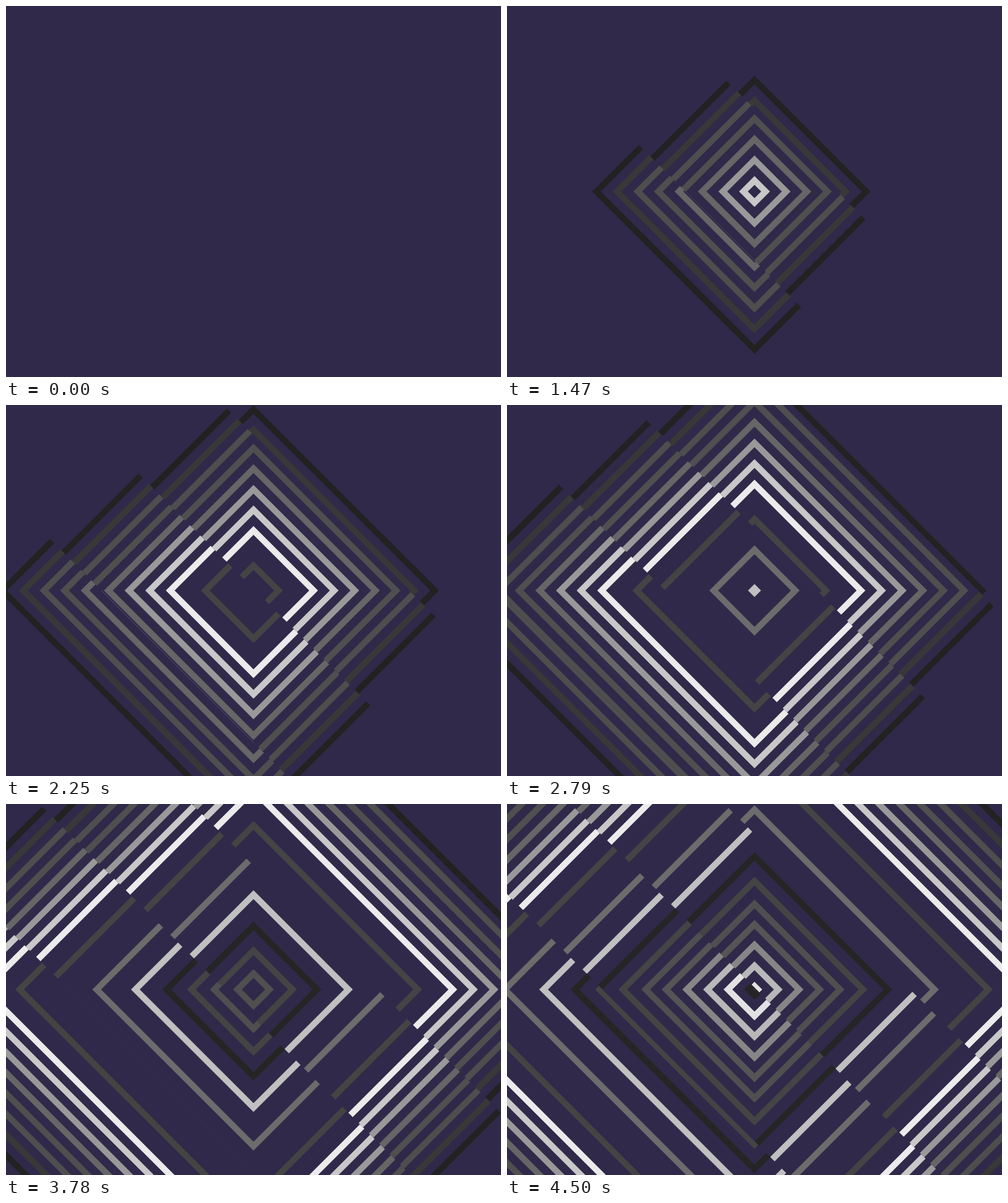
These frames come from a looping animation (800x600 px, 4530 ms). An HTML page with a canvas:

```html
<!DOCTYPE html>
<html lang="en">
<head>
<meta charset="utf-8">
<title>Stepped diamonds</title>
<style>
  html, body { margin: 0; width: 100%; height: 100%; overflow: hidden; background: #30294a; }
  canvas { display: block; }
</style>
</head>
<body>
<canvas id="stage" width="800" height="600"></canvas>
<script>
const ctx = document.getElementById('stage').getContext('2d');

const LOOP = 4530, TICK = 30;
const WAVE = 100 / 3;     // wave travel per tick
const STRIP = 250;        // wave travel between two steps
const GROW = 37.5;        // ring growth at each step
const LINE = 10 * Math.SQRT2;
const REACH = 500;        // the wave is flat beyond this
const FAR = 1600;

// [how far the ring trails behind the first one, colour]
const rings = [
  [0, '#222222'], [33.3, '#383838'], [66.7, '#4e4e4e'], [100, '#4f4f4f'],
  [133.3, '#666666'], [166.7, '#999999'], [200, '#c8c8c8'], [233.3, '#ebebeb'],
  [290, '#444444'], [377, '#6c6c6c'], [439.5, '#c0c0c0'], [490, '#252525'],
  [530, '#444444'], [567, '#4f4f4f'], [600, '#555555'], [633.3, '#868686'],
  [667, '#b8b8b8'], [700, '#e2e2e2'], [733.3, '#252525']
];

// Phase of the wave at a distance from the centre; it flattens outwards.
const phase = d => 1.02 * d * (1 - (d / 1040) ** 3);

// Place where the wave has the given phase.
function place(x) {
  let lo = 0, hi = 655;
  for (let i = 0; i < 30; i++) {
    const mid = (lo + hi) / 2;
    if (phase(mid) < Math.abs(x)) lo = mid; else hi = mid;
  }
  return Math.sign(x) * lo + 3;
}

function square(half) {
  ctx.rect(-half, -half, 2 * half, 2 * half);
}

function drawStrip(low, high, size) {
  ctx.save();
  ctx.beginPath();
  ctx.rect(-FAR, low, 2 * FAR, high - low);
  ctx.clip();
  for (const [lag, colour] of rings) {
    const r = size - lag;
    if (r <= 0) break;
    ctx.beginPath();
    square(r);
    if (r > LINE) square(r - LINE);
    ctx.fillStyle = colour;
    ctx.fill('evenodd');
  }
  ctx.restore();
}

function draw(tick) {
  ctx.setTransform(1, 0, 0, 1, 0, 0);
  ctx.fillStyle = '#30294a';
  ctx.fillRect(0, 0, 800, 600);
  // first axis points down right, second axis up right
  ctx.setTransform(0.5, 0.5, 0.5, -0.5, 400, 300);

  const front = tick * WAVE;
  let step = Math.floor((front - REACH) / STRIP + 1e-6);
  let high = FAR;
  while (high > -FAR) {
    const x = front - (step + 1) * STRIP;
    const low = x > -REACH + 0.01 ? place(x) : -FAR;
    drawStrip(low, high, step * GROW);
    high = low;
    step++;
  }
}

const start = performance.now();
function frame() {
  const t = Math.max(0, performance.now() - start) % LOOP;
  draw(Math.floor(t / TICK));
  requestAnimationFrame(frame);
}
frame();
</script>
</body>
</html>
```
